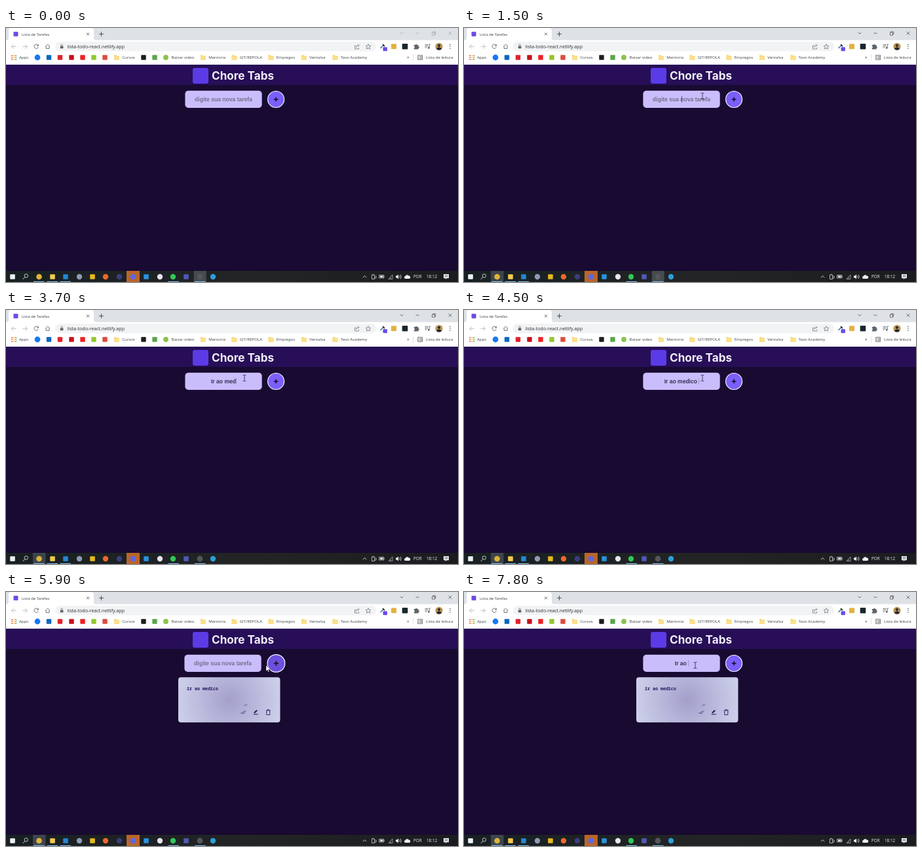
Recreate the animation shown at these times as an HTML page. Size 690x388 px, loop 8000 ms.

```html
<!DOCTYPE html>
<html lang="pt">
<head>
<meta charset="utf-8">
<title>Lista de Tarefas</title>
<style>
  html, body { margin: 0; width: 100%; height: 100%; overflow: hidden; background: #180a31; }
  svg { display: block; width: 690px; height: 388px; }
  text { white-space: pre; }
  .ui { font-family: "Open Sans", "Noto Sans", sans-serif; }
  .field { font: bold 8.56px "Liberation Sans", Arial, sans-serif; text-anchor: middle; }
  .title { font: 700 17.1px Inter, sans-serif; }
  .mono { font: bold 6.65px "Noto Sans Mono", "DejaVu Sans Mono", monospace; }
</style>
</head>
<body>
<svg id="stage" viewBox="0 0 690 388" xmlns="http://www.w3.org/2000/svg"></svg>
<script>
const LOOP = 8000, STEP = 100;
const ACTIVATE = 1200, HOVER = [5600, 6000], SUBMIT = 5800;
const PLACEHOLDER = 'digite sua nova tarefa';

const rect = (x, y, w, h, fill, r = 0, extra = '') =>
  `<rect x="${x}" y="${y}" width="${w}" height="${h}" rx="${r}" fill="${fill}" ${extra}/>`;
const circle = (x, y, r, fill, extra = '') => `<circle cx="${x}" cy="${y}" r="${r}" fill="${fill}" ${extra}/>`;
const square = (x, y, size, fill) => rect(x - size / 2, y - size / 2, size, size, fill, 1);
const line = (d, color, width = .8, extra = '') =>
  `<path d="${d}" fill="none" stroke="${color}" stroke-width="${width}" ${extra}/>`;
const shape = (d, fill) => `<path d="${d}" fill="${fill}"/>`;
const label = (x, y, text, size = 6.1, fill = '#3c4043') =>
  `<text class="ui" x="${x}" y="${y}" font-size="${size}" fill="${fill}">${text}</text>`;
const folder = x => shape(`M${x - 4} 41.2h3l1 1.2h4v6.6h-8z`, '#f7d774') +
  shape(`M${x - 4} 43.6h8v5.4h-8z`, '#fbe08c');

function tabStrip() {
  const ink = '#4a4d52';
  return rect(0, 0, 690, 19, '#dee1e6') +
    shape('M0 19q4 0 4-4V4q0-4 4-4H130q4 0 4 4V15q0 4 4 4z', '#fff') +
    square(15, 9.3, 7, '#6f4be0') +
    label(24, 11.6, 'Lista de Tarefas', 5.9) +
    line('M123 7.2l4 4m0-4l-4 4', ink) +
    line('M142 9.2h7m-3.5-3.5v7', ink, 1) +
    line('M601.5 6.5l2.5 2.5 2.5-2.5M625.5 8h5M650.5 7h4v4h-4zM651.7 7v-1.3h4v4h-1.2M675.5 5.5l5 5m0-5l-5 5',
      '#444', .7, 'id="controls"');
}

function toolbar() {
  const ink = '#5f6368', faint = '#b4b7bb';
  return rect(0, 18.5, 690, 37.5, '#fff') +
    rect(75, 21, 490, 14.4, '#f1f3f4', 7.2) +
    line('M15.5 28.3h-7m3.3-3.3l-3.3 3.3 3.3 3.3M25.5 28.3h7m-3.3-3.3l3.3 3.3-3.3 3.3', faint, .9) +
    line('M48.8 26.2a3.2 3.2 0 1 0 .5 3', ink, .9) + shape('M49.8 24.6v3h-3z', ink) +
    line('M60.2 28.2l3.4-3.2 3.4 3.2M61.2 27.8v3.6h4.8v-3.6', ink, .9) +
    rect(82.8, 27.4, 4.6, 3.8, ink, .5) + line('M83.8 27.5v-1.2a1.3 1.3 0 0 1 2.6 0v1.2', ink, .7) +
    label(93.5, 30.8, 'lista-todo-react.netlify.app', 7.2, '#2c2f33') +
    line('M534.5 27h-2v5h6v-2M534.5 30q0-3.5 4-3.5m-1.5-2l2 2-2 2', ink, .7) +
    line('M553 24.6l1.2 2.5 2.7.3-2 1.9.6 2.7-2.5-1.4-2.5 1.4.6-2.7-2-1.9 2.7-.3z', ink, .7) +
    line('M571.5 31l4.5-4.5', '#3f6f9f', 1.5) + line('M575 25l3 3', '#333', 1.8) +
    rect(575.5, 29.2, 6.4, 6, '#6a4be8', 1) +
    square(592, 28.3, 8, '#e3b23c') + square(609, 28.3, 8.6, '#17272f') +
    shape('M622.8 26h2.2a1.3 1.3 0 0 1 2.6 0h2v2.2a1.3 1.3 0 0 1 0 2.6v1.6h-6.8v-2a1.2 1.2 0 0 0 0-2.4z', ink) +
    line('M639.5 25.5h5m-5 2.2h5m-5 2.2h3m3.7 0v-5h2', ink, .9) + circle(645.3, 30.4, 1.4, ink) +
    circle(661, 28.3, 5.6, '#b9954f') + circle(661, 26.8, 2, '#2b2430') +
    shape('M656.8 31.8q4.2-5 8.4 0a5.5 5.5 0 0 1-8.4 0z', '#2b2430') +
    [25.4, 28.3, 31.2].map(y => circle(678, y, .8, ink)).join('');
}

function bookmarks() {
  const dots = ['#ea4335', '#fbbc04', '#34a853', '#4285f4'];
  let out = label(20, 47.3, 'Apps');
  for (let i = 0; i < 9; i++)
    out += square(9.2 + i % 3 * 2.9, 42.2 + Math.floor(i / 3) * 2.9, 1.9, dots[(i + Math.floor(i / 3)) % 4]);
  out += circle(48, 45, 4.4, '#1877f2') + circle(244, 45, 3.9, '#8bc34a');
  const marks = [[65.5, '#0a66c2'], [82.5, '#e0222b'], [100, '#c4101a'], [117, '#f02020'],
    [134, '#93c62d'], [151, '#dd4b3e'], [210, '#1c1c1c'], [227, '#5aa54a']];
  out += marks.map(([x, color]) => square(x, 45, 7.4, color)).join('');
  const folders = [[169, 'Cursos'], [301, 'Mentoria'], [348.5, 'GIT/REPOLA'],
    [404.5, 'Empregos'], [455, 'Ventalva'], [502.5, 'Tavo Academy']];
  out += folders.map(([x, name]) => folder(x) + label(x + 8.2, 47.3, name)).join('');
  return out + label(252.5, 47.3, 'Baixar video') +
    label(612, 47, '»', 7) + line('M621.5 40v10', '#cfd2d6', .6) +
    line('M628.7 41.7h7v6.6h-7zM630.2 43.6h1m1 0h2.4M630.2 45h1m1 0h2.4M630.2 46.5h1m1 0h2.4', '#4a4d52', .8) +
    label(641, 47.3, 'Lista de leitura');
}

function page() {
  return rect(0, 56, 690, 315, '#180a31') +
    rect(0, 56, 690, 31, '#270e57') +
    rect(285, 61, 24, 24, '#5b3be6', 3) +
    '<text class="title" x="314" y="79" fill="#f3f0fb">Chore Tabs</text>' +
    rect(273.4, 95.8, 117.3, 26.2, '#cabdfc', 5, 'id="box"') +
    '<g id="button">' + circle(0, 0, 12.5, '#7b5ffb', 'id="disc" stroke="#f4f1ff" stroke-width="1.2"') +
    line('M-3.3 0h6.6M0 -3.3v6.6', '#120825', 1.5) + '</g>' +
    '<text class="field" id="entry" y="111.6"></text>' +
    rect(0, 104, .7, 10, '#1b1430', 0, 'id="caret"');
}

function card() {
  const ink = '#22135a';
  return '<g id="card">' +
    rect(263, 131.5, 155.5, 69, '#0b0419', 4, 'opacity=".45"') +
    rect(263, 130.3, 155.5, 69, 'url(#cardFill)', 4) +
    `<text class="mono" x="276" y="149.8" fill="${ink}">ir ao medico</text>` +
    line('M358.3 184l1.7 1.8 3.8-4.4M361.5 185l.9 .9 3.9-4.5', ink, .7) +
    line('M363.4 174.2l2.4-2.6m.2 2.2l2-2.2', ink, .6) +
    shape('M378.5 185.3l.3-1.7 3.6-3.6 1.4 1.4-3.6 3.6z', ink) + line('M377.8 186.8h7', ink, 1) +
    line('M397.8 181.6v6h5v-6M396.8 181h7M399 180.8v-1h2.6v1', ink, .9) + '</g>';
}

function taskbar() {
  const white = '#eef1f4', under = '#7fbdea';
  const apps = [[112, '#8f9bb3'], [152, '#f0662d'], [173, '#3b3d80'],
    [235, '#ebe3f2'], [255, '#2fc956'], [316, '#2c9fda']];
  const tiles = [[10, white], [71, '#f3c94f'], [91, '#2387d2'], [132, '#e6b91c'],
    [214, '#2a93dd'], [275, '#5059b8']];
  return rect(0, 371, 690, 17, 'url(#barFill)') +
    rect(41, 371, 19.5, 17, '#3d454c', 0, 'id="browserTile"') +
    rect(286.8, 371, 19, 17, '#454b4e', 0, 'id="recorderTile"') +
    rect(184, 371, 20, 17, '#b9652b') +
    tiles.map(([x, color]) => square(x, 380, 7.6, color)).join('') +
    apps.map(([x, color]) => circle(x, 380, 4.2, color)).join('') +
    circle(50.5, 380, 4.3, '#dfb33a') + circle(194, 380, 4.3, '#5b67e6') +
    circle(296, 380, 4.4, '#55575a') +
    circle(30.8, 378.5, 2.7, 'none', `stroke="${white}" stroke-width=".8"`) + line('M28.8 380.6l-3 3.2', white, .9) +
    [42, 62.5, 82.5, 247.5, 288].map(x => rect(x, 386.9, 16.5, 1.1, under)).join('') +
    line('M544.8 381.3l2.7-2.7 2.7 2.7', white, .8) +
    line('M558.5 377h4v6.5h-4zM560.5 375.8v1.2M563.5 379h1.5v3h-2', white, .7) +
    line('M569.7 377.5h7v4.5h-7zM577.2 379v1.5', white, .7) + rect(571, 378.6, 4.6, 2.4, white) +
    line('M584 383.5l6-6.5v6.5zM587 383v-2.5', '#a9afb5', .8) +
    shape('M595 378.5h1.8l2.2-2v7l-2.2-2H595z', white) +
    line('M600.5 378q1.4 2 0 4M602.2 376.8q2.2 3.2 0 6.4', white, .7) +
    shape('M609.5 383a2.1 2.1 0 0 1 .2-4.1 2.8 2.8 0 0 1 5-.3 2.2 2.2 0 0 1 .8 4.4z', white) +
    label(622, 382.2, 'POR', 6.3, white) + label(642, 382.2, '18:12', 6.3, white) +
    shape('M668 376h8v6.3h-3.2l-1.8 1.8v-1.8h-3z', white) +
    line('M669.5 378h5m-5 1.9h5', '#121820', .6);
}

const pointers = '<g id="arrow">' +
  '<path d="M0 0v9l2.1-1.9 1.5 3.2 1.4-.6-1.5-3.1h2.9z" fill="#fff" stroke="#111" stroke-width=".4"/></g>' +
  '<g id="beam">' + line('M-2.3 -4.6q2.3-.3 2.3 .9V3.7q0 1.2-2.3 .9M2.3 -4.6q-2.3-.3-2.3 .9M0 3.7q0 1.2 2.3 .9', '#241c38', .8) + '</g>';

document.getElementById('stage').innerHTML =
  '<defs><radialGradient id="cardFill" gradientUnits="userSpaceOnUse" cx="341" cy="165" r="82">' +
  '<stop offset="0" stop-color="#a39fca"/><stop offset=".45" stop-color="#b7b6da"/>' +
  '<stop offset="1" stop-color="#cdd0ea"/></radialGradient>' +
  '<linearGradient id="barFill"><stop offset="0" stop-color="#182023"/>' +
  '<stop offset=".55" stop-color="#232425"/><stop offset="1" stop-color="#1b1c1f"/></linearGradient></defs>' +
  tabStrip() + toolbar() + bookmarks() + page() + card() + taskbar() + pointers;

const el = Object.fromEntries([...document.querySelectorAll('[id]')].map(n => [n.id, n]));
const show = (node, on) => node.setAttribute('display', on ? 'inline' : 'none');
const place = (node, x, y, scale = 1) => node.setAttribute('transform', `translate(${x} ${y}) scale(${scale})`);

// [time, field text]; null means the field has no focus
const edits = [[0, null], [1300, ''], [2300, 'I'], [2400, 'Ir'], [2600, 'Ir '], [2700, 'Ir a'],
  [2800, 'Ir ao'], [2900, 'Ir ao '], [3200, 'Ir ao m'], [3300, 'Ir ao me'], [3500, 'Ir ao med'],
  [4300, 'Ir ao medi'], [4400, 'Ir ao medic'], [4500, 'Ir ao medico '], [4700, 'Ir ao medico'],
  [SUBMIT, null], [6200, ''], [7000, 'I'], [7100, 'Ir'], [7200, 'Ir '], [7400, 'Ir a'],
  [7500, 'Ir ao'], [7600, 'Ir ao ']];

// [time, x, y] of the pointer
const route = [[0, 297, 388], [100, 297, 384], [700, 325, 240], [1200, 364, 104], [5000, 364, 104],
  [5500, 393, 113], [5700, 402, 112], [5800, 402, 112], [5900, 397, 112], [6200, 353, 112], [LOOP, 353, 112]];

function pointerAt(t) {
  const i = route.findIndex(p => p[0] > t);
  const [t0, x0, y0] = route[i - 1], [t1, x1, y1] = route[i];
  const k = (t - t0) / (t1 - t0), ease = k * k * (3 - 2 * k);
  return [x0 + (x1 - x0) * ease, y0 + (y1 - y0) * ease];
}

function render(time) {
  const t = Math.floor(time % LOOP / STEP) * STEP;
  const [since, text] = edits.filter(e => e[0] <= t).pop();
  const hover = t >= HOVER[0] && t < HOVER[1];
  const shift = hover ? -1 : 0;

  el.entry.textContent = text || PLACEHOLDER;
  el.entry.setAttribute('x', 332 + shift);
  el.entry.setAttribute('fill', text ? '#3a3350' : '#766f8c');
  const caretX = 332 + (text ? el.entry.getComputedTextLength() / 2 : 0);
  el.caret.setAttribute('x', caretX);
  el.caret.setAttribute('opacity', text ? .35 : .8);
  show(el.caret, text !== null && (t - since) % 1000 < 500);

  el.box.setAttribute('x', 273.4 + shift);
  place(el.button, hover ? 412.4 : 412.1, 109, hover ? 1.07 : 1);
  el.disc.setAttribute('fill', hover ? '#6a50dd' : '#7b5ffb');
  show(el.card, t >= SUBMIT);

  const active = t >= ACTIVATE;
  el.controls.setAttribute('opacity', active ? 1 : .4);
  show(el.browserTile, active);
  show(el.recorderTile, t < 2000);

  const [x, y] = pointerAt(t);
  const overField = x > 273 && x < 391 && y > 96 && y < 122;
  place(el.arrow, x, y);
  place(el.beam, x, y);
  show(el.arrow, !overField && t >= 100);
  show(el.beam, overField);
}

const start = performance.now();
function tick(now) {
  render(Math.max(0, now - start));
  requestAnimationFrame(tick);
}
render(0);
requestAnimationFrame(tick);
</script>
</body>
</html>
```
